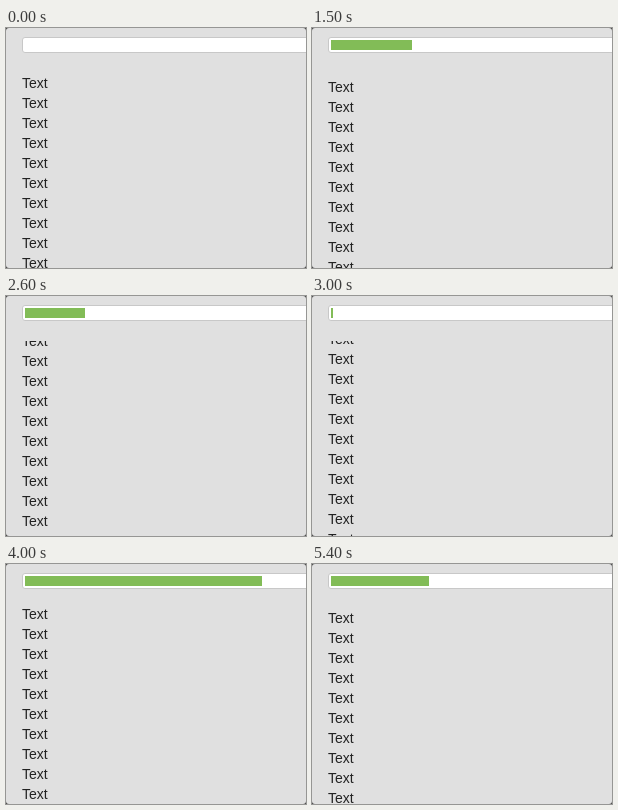
An HTML page that plays this animation: 300x240 px, repeating every 6 s.

```html
<!DOCTYPE html>
<html lang="en">
<head>
<meta charset="utf-8">
<title>Scroll progress</title>
<style>
html, body { margin: 0; width: 100%; height: 100%; overflow: hidden; background: #444; }
#page {
  position: relative; width: 300px; height: 240px; overflow: hidden;
  background: #e0e0e0; border-radius: 3px;
  font: 14px/20px "Liberation Sans", Arial, sans-serif; color: #222;
}
#track {
  position: absolute; left: 16px; top: 9px; width: 340px; height: 14px;
  background: #fff; border: 1px solid #c8c8c8; border-radius: 3px;
}
#bar { position: absolute; left: 2px; top: 2px; height: 10px; background: #82bc57; }
#view { position: absolute; left: 16px; top: 45px; right: 0; bottom: 0; overflow: hidden; }
</style>
</head>
<body>
<div id="page">
  <div id="track"><div id="bar"></div></div>
  <div id="view"><div id="list"></div></div>
</div>
<script>
const LOOP = 6000, STEP = 100, ROW = 20;
const SCROLL_PER_PIXEL = 7.12;

// [time in ms, scroll offset in px]
const keys = [
  [0, 0], [400, 0], [900, 281], [1100, 360], [1800, 686], [2000, 701],
  [2300, 701], [3000, 12], [3500, 2350], [3600, 2350], [4000, 1685],
  [4300, 1160], [4700, 1022], [5000, 740], [5400, 701], [LOOP, 701]
];

const bar = document.getElementById('bar');
const list = document.getElementById('list');
for (let i = 0; i < 12; i++) {
  list.appendChild(document.createElement('div')).textContent = 'Text';
}

const slope = i => (keys[i + 1][1] - keys[i][1]) / (keys[i + 1][0] - keys[i][0]);

// Harmonic mean keeps the curve from overshooting its keys.
function tangent(i) {
  if (i === 0 || i === keys.length - 1) return 0;
  const a = slope(i - 1), b = slope(i);
  return a * b > 0 ? 2 * a * b / (a + b) : 0;
}

function scrollAt(time) {
  const i = keys.findIndex(key => key[0] > time) - 1;
  const [t0, s0] = keys[i], [t1, s1] = keys[i + 1];
  const span = t1 - t0, u = (time - t0) / span, v = 1 - u;
  return s0 * (1 + 2 * u) * v * v + s1 * (3 - 2 * u) * u * u
    + span * u * v * (tangent(i) * v - tangent(i + 1) * u);
}

function draw(now) {
  const time = Math.floor(now % LOOP / STEP) * STEP;
  const scroll = Math.round(scrollAt(time));
  bar.style.width = scroll / SCROLL_PER_PIXEL + 'px';
  list.style.transform = `translateY(${-(scroll % ROW)}px)`;
}

const start = performance.now();
function tick() {
  draw(performance.now() - start);
  requestAnimationFrame(tick);
}
tick();
</script>
</body>
</html>
```
